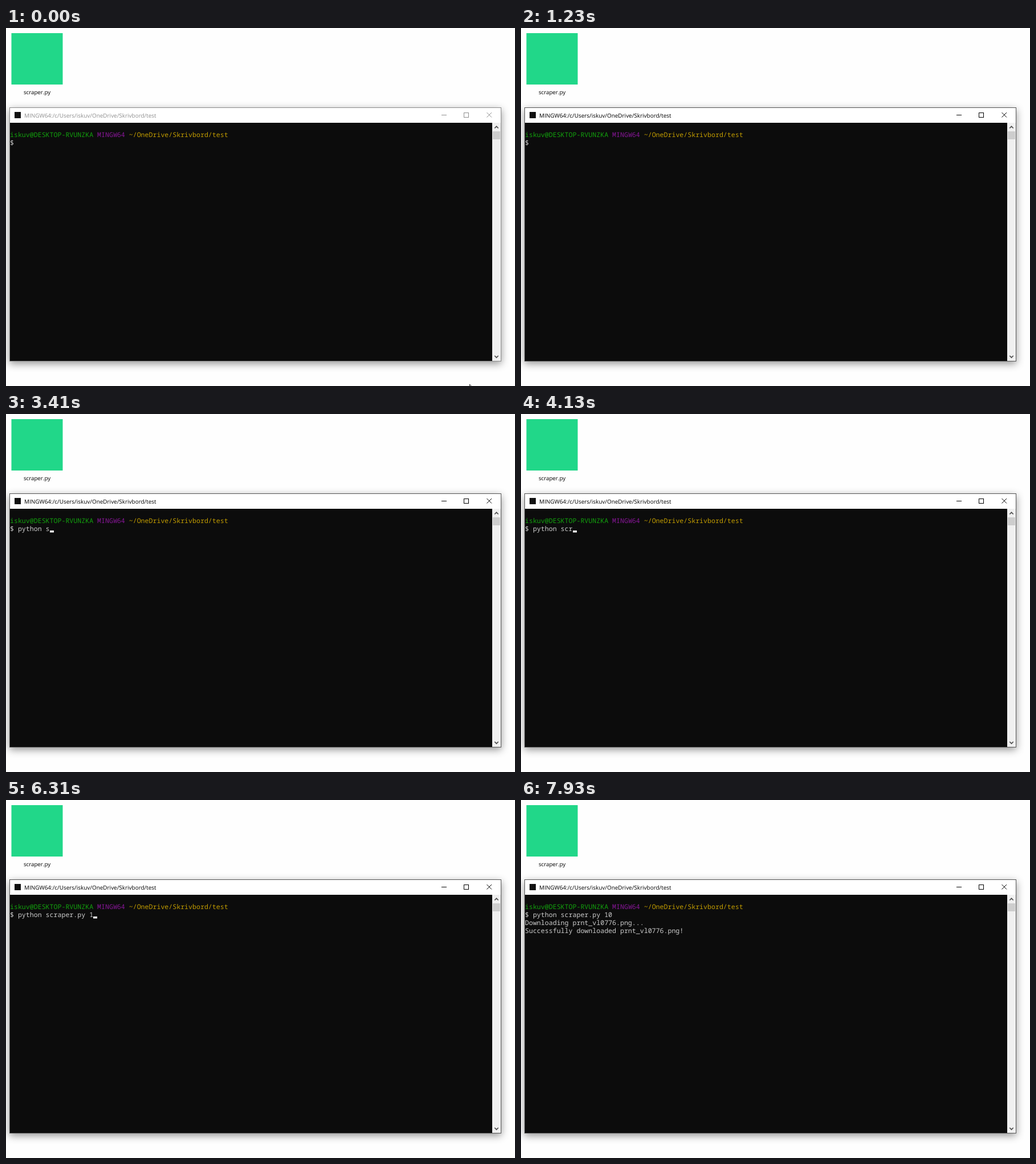
These frames come from a looping animation (893 px wide and 627 px high, 8000 ms). An HTML page:

```html
<!DOCTYPE html>
<html lang="en">
<head>
<meta charset="utf-8">
<title>Terminal</title>
<style>
  html, body { margin: 0; width: 100%; height: 100%; overflow: hidden; background: #fefefe; }
  svg { display: block; }
  text { white-space: pre; text-rendering: geometricPrecision; }
  .ui { font-family: "Open Sans", "Noto Sans", sans-serif; }
  .term { font: 11.6px "Noto Sans Mono", "DejaVu Sans Mono", monospace; fill: #ccc; }
  .shadow { filter: drop-shadow(0 4px 7px rgba(0, 0, 0, .42)); }
  .chevron { fill: none; stroke: #505050; stroke-width: 1.7; }
  #frame { fill: none; stroke: #555; }
  #title { fill: #000; font-size: 9.95px; }
  #buttons { fill: none; stroke: #000; }
  .idle #frame { stroke: #8c8c8c; }
  .idle #title { fill: #8f8f8f; }
  .idle #buttons { stroke: #8f8f8f; }
</style>
</head>
<body>
<svg id="stage" class="idle" width="893" height="627" viewBox="0 0 893 627">
  <rect x="9.5" y="9" width="90" height="90" fill="#21d789"/>
  <text class="ui" x="54.5" y="115.5" font-size="9.75" text-anchor="middle">scraper.py</text>

  <rect class="shadow" x="6" y="139" width="863" height="445" fill="#fff"/>
  <rect x="15" y="147" width="11" height="11" fill="#111"/>
  <text id="title" class="ui" x="32" y="156.5">MINGW64:/c/Users/iskuv/OneDrive/Skrivbord/test</text>
  <g id="buttons">
    <path d="M764 152.5h9"/>
    <rect x="803.5" y="148.5" width="8" height="8"/>
    <path d="M843.5 148l8.5 8.5M852 148l-8.5 8.5"/>
  </g>
  <rect x="7" y="166" width="846" height="417" fill="#0c0c0c"/>
  <rect x="853" y="166" width="15" height="417" fill="#f0f0f0"/>
  <rect x="854" y="181" width="13" height="14" fill="#cdcdcd"/>
  <path class="chevron" d="M857.3 175.5l3.2-3.2 3.2 3.2M857.3 574l3.2 3.2 3.2-3.2"/>
  <rect id="frame" x="6.5" y="139.5" width="862" height="444"/>

  <g class="term">
    <text x="7" y="191"><tspan fill="#13a10e">iskuv@DESKTOP-RVUNZKA</tspan> <tspan fill="#881798">MINGW64</tspan> <tspan fill="#c19c00">~/OneDrive/Skrivbord/test</tspan></text>
    <text id="prompt" x="7" y="205">$ </text>
    <text id="begin" x="7" y="219">Downloading prnt_vl0776.png...</text>
    <text id="done" x="7" y="233">Successfully downloaded prnt_vl0776.png!</text>
  </g>
  <rect id="caret" width="7" height="3.5" fill="#f2f2f2"/>

  <g id="mouse">
    <circle id="halo" cx="-1" cy="-1" r="10.5" fill="#ff0" fill-opacity=".48"/>
    <path d="M0 0v13.5l3.1-2.9 2.2 5 2.1-.9-2.2-4.9h4.3z" fill="#fff" stroke="#000" stroke-width=".8"/>
  </g>
</svg>
<script>
const LOOP = 8000, CELL = 6.96, LINE = 14;
const CLICK = 210, HIDE = 360, ENTER = 7320, BEGIN = 7780, DONE = 7930;
const FROM = [814, 625], TO = [752, 521];

// Bursts of typing: first key in ms, gap between keys, text
const BURSTS = [
  [2410, 125, "python "],
  [3410, 0, "s"],
  [3970, 155, "craper."],
  [5530, 115, "py "],
  [6310, 150, "10"]
];
const KEYS = BURSTS.flatMap(([first, gap, text]) =>
  [...text].map((char, i) => ({ char, at: first + i * gap })));

const $ = id => document.getElementById(id);
const [stage, prompt, begin, done, caret, mouse, halo] =
  ["stage", "prompt", "begin", "done", "caret", "mouse", "halo"].map($);
const show = (el, on) => el.setAttribute("visibility", on ? "visible" : "hidden");

// The caret toggles on a free-running timer; every key switches it on.
const blinks = t => Math.floor((t - 170) / 530);
const caretOn = (t, lastKey) => (blinks(t) - blinks(lastKey)) % 2 === 0;

function drawMouse(t) {
  const k = 1 - (1 - Math.min(t / CLICK, 1)) ** 2;
  const [x, y] = FROM.map((from, i) => from + (TO[i] - from) * k);
  mouse.setAttribute("transform", `translate(${x} ${y})`);
  show(mouse, t < HIDE);
  show(halo, t >= CLICK && t < HIDE);
}

function draw(t) {
  const active = t >= CLICK, entered = t >= ENTER;
  const typed = KEYS.filter(key => key.at <= t);
  const lastKey = entered ? ENTER : typed.length ? typed[typed.length - 1].at : 0;

  stage.classList.toggle("idle", !active);
  prompt.textContent = "$ " + typed.map(key => key.char).join("");
  show(begin, t >= BEGIN);
  show(done, t >= DONE);

  show(caret, active && caretOn(t, lastKey));
  caret.setAttribute("x", Math.round(7 + (entered ? 0 : typed.length + 2) * CELL));
  caret.setAttribute("y", 204 + (entered ? LINE : 0));
  drawMouse(t);
}

const start = performance.now();
function tick() {
  draw((performance.now() - start) % LOOP);
  requestAnimationFrame(tick);
}
tick();
</script>
</body>
</html>
```
